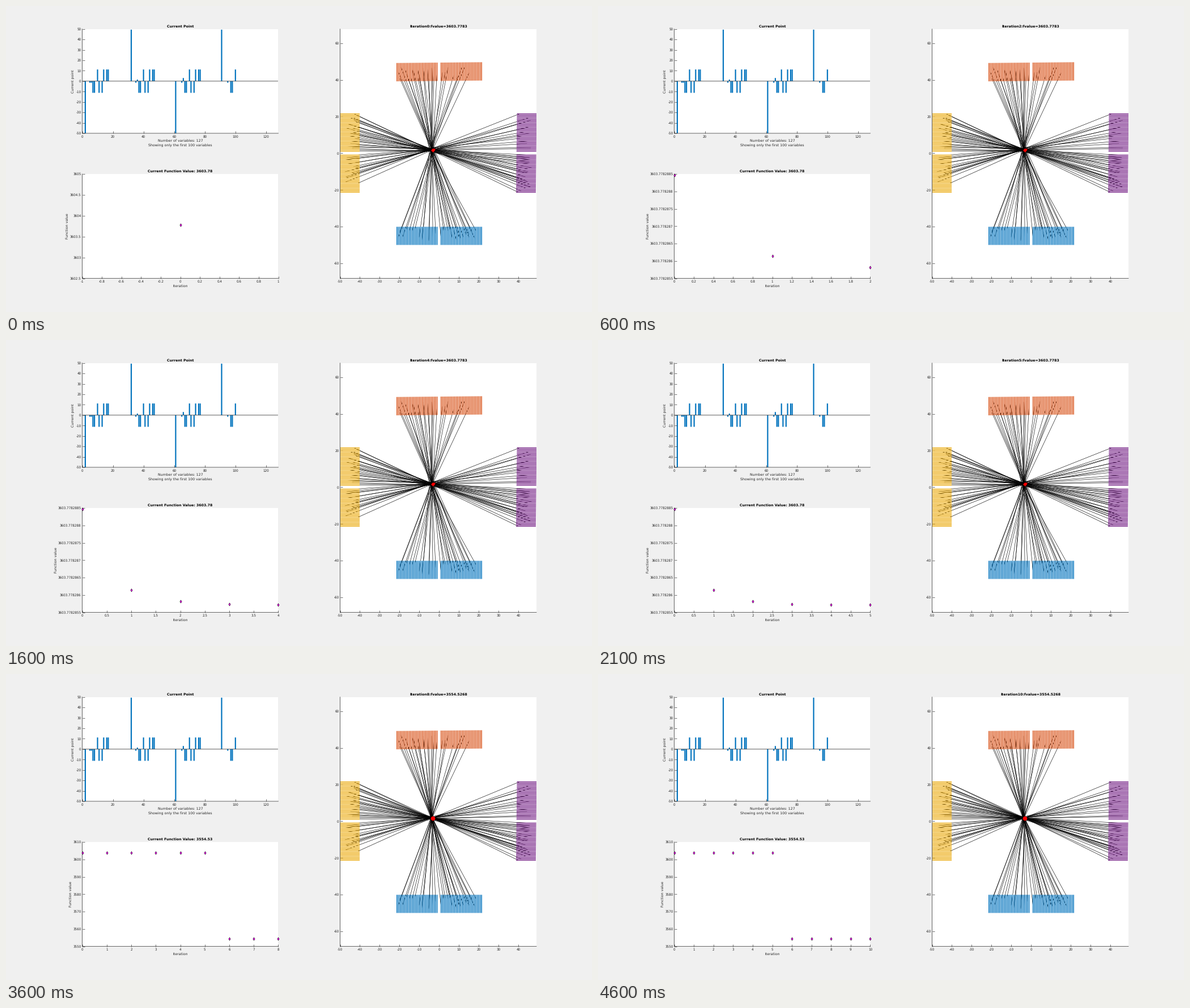
Write a matplotlib script that moves like this. It is 1034 px wide and 541 px high and loops after 5.6 s.

```python
import numpy as np
import matplotlib.pyplot as plt
from matplotlib.animation import FuncAnimation
from matplotlib.collections import LineCollection

W, H, DPI = 1034, 541, 100
PT = 72 / DPI                     # points per pixel
TICK_SIZE, LABEL_SIZE = 5.66, 6.22
INK = "#262626"
BLUE, ORANGE, YELLOW, PURPLE = "#0072BD", "#D95319", "#EDB120", "#7E2F8E"

plt.rcParams.update({
    "font.family": "DejaVu Sans",
    "text.hinting": "none",
    "toolbar": "None",
})

fig = plt.figure(figsize=(W / DPI, H / DPI), dpi=DPI, facecolor="#f0f0f0")


def make_axes(left, top, right, bottom, xlim, ylim):
    """Axes placed by pixel edges, with only left and bottom spines."""
    ax = fig.add_axes([left / W, 1 - bottom / H,
                       (right - left) / W, (bottom - top) / H])
    ax.set(xlim=xlim, ylim=ylim, facecolor="white")
    ax.spines[["top", "right"]].set_visible(False)
    for side in ("left", "bottom"):
        ax.spines[side].set(linewidth=0.7 * PT, color=INK, snap=False)
    style = dict(direction="in", length=3.6 * PT, width=0.65 * PT,
                 color=INK, labelcolor=INK, labelsize=TICK_SIZE * PT)
    ax.tick_params(axis="x", pad=3.2 * PT, **style)
    ax.tick_params(axis="y", pad=2 * PT, **style)
    return ax


def put(x, y, text="", bold=False, rotation=0):
    """Text centred on a pixel position."""
    drop = 0.365 * LABEL_SIZE
    dx, dy = (drop, 0) if rotation else (0, drop)
    return fig.text((x + dx) / W, 1 - (y + dy) / H, text,
                    size=LABEL_SIZE * PT, ha="center", va="baseline",
                    rotation=rotation, rotation_mode="anchor",
                    weight="bold" if bold else "normal",
                    color="black" if bold else INK)


def steps(lo, hi, step):
    count = int(round((hi - lo) / step)) + 1
    return np.round(lo + step * np.arange(count), 7) + 0.0


def set_ticks(axis, values):
    labels = [f"{v:.11g}" for v in values]
    axis.set_ticks(values, labels)
    return max(map(len, labels))


# Current point: bars for the first 100 variables
bars = make_axes(134.5, 40.7, 480.5, 225, (0, 128), (-50, 50))
set_ticks(bars.xaxis, steps(0, 120, 20))
set_ticks(bars.yaxis, steps(-50, 50, 10))

point = np.zeros(101)
point[[2, 61]] = -50
point[[32, 91]] = 49.4
for base, small in zip((0, 30, 60, 90), (-1.5, 1.5, 3, 0)):
    signs = {5: -1.5, 6: small}
    signs.update({k: -11.2 for k in (7, 8, 11, 13)})
    signs.update({k: 11.2 for k in (10, 14, 16, 17)})
    for k, value in signs.items():
        if base + k <= 100:
            point[base + k] = value
used = np.flatnonzero(point)
bars.bar(used, point[used], width=0.8, color=BLUE, linewidth=0, snap=False)
bars.axhline(0, color=INK, lw=0.75 * PT, snap=False)

put(307.5, 35.7, "Current Point", bold=True)
put(307.5, 237.6, "Number of variables: 127")
put(307.5, 245.2, "Showing only the first 100 variables")
put(117.7, 133, "Current point", rotation=90)

# Function value history
BASE = 3603.778
history = [BASE + d * 1e-7 for d in (2884.6, 2861.4, 2858.1, 2857.4, 2857.2, 2857.2)]
history += [3554.5268] * 5

curve = make_axes(134.5, 297, 480.5, 481.5, (-1, 1), (3602.5, 3605))
marks, = curve.plot([], [], ls="", marker="d", ms=3.8 * PT, mfc="#ff00ff",
                    mec="black", mew=0.55 * PT, snap=False,
                    clip_on=False, zorder=5)
curve_title = put(307.5, 292, bold=True)
put(307.5, 494.6, "Iteration")
value_label = put(108, 389, "Function value", rotation=90)
LABEL_X = {4: 113.5, 6: 108, 12: 88}     # by widest tick label


def value_range(it):
    if it == 0:
        return 3602.5, 3605, 0.5
    if it == 1:
        return BASE + 2.860e-4, BASE + 2.885e-4, 5e-7
    if it < 6:
        return BASE + 2.855e-4, BASE + 2.885e-4, 5e-7
    return 3550, 3610, 10


def iteration_range(it):
    if it == 0:
        return -1, 1, 0.2
    return 0, it, {1: 0.1, 2: 0.2}.get(it, 0.5 if it < 6 else 1)


# Lanes around a hub, and the paths that run into it
plan = make_axes(589.5, 40.7, 936, 481.5, (-50, 49.2), (-68.2, 67.7))
set_ticks(plan.xaxis, steps(-50, 40, 10)[[0, 1, 3, 4, 5, 6, 7, 9]]
          if False else steps(-50, 40, 10))
set_ticks(plan.yaxis, steps(-60, 60, 20))
plan_title = put(763, 35.7, bold=True)

LANES = 30
TILT = 0.01
# colour, vertical?, lane span, inner edge, outer edge, paths, lane share used
BLOCKS = [
    (ORANGE, True, (-1, -21.3), 39.4, 49.4, 20, 1.0),
    (ORANGE, True, (1, 21.5), 39.4, 49.4, 8, 0.7),
    (BLUE, True, (-1, -21.3), -40.1, -50, 14, 1.0),
    (BLUE, True, (1, 21.5), -40.1, -50, 18, 0.87),
    (YELLOW, False, (1.1, 21.5), -40.1, -50, 29, 1.0),
    (YELLOW, False, (-1, -21.3), -40.1, -50, 16, 0.76),
    (PURPLE, False, (1.1, 21.5), 39.1, 49.1, 14, 1.0),
    (PURPLE, False, (-1, -21.3), 39.1, 49.1, 28, 0.98),
]

rng = np.random.default_rng(12)
ends = []
for color, vertical, span, inner, outer, count, share in BLOCKS:
    lanes = []
    for pos in np.linspace(*span, LANES):
        shift = TILT * pos if inner > 0 else 0
        lane = np.array([(pos, inner + shift), (pos, outer + shift)])
        lanes.append(lane if vertical else lane[:, ::-1])
    plan.add_collection(LineCollection(lanes, colors=color, zorder=4, snap=False,
                                       linewidths=1.45 * PT, capstyle="butt"))
    picks = (np.arange(count) + rng.uniform(0, 1, count)) / count * share
    for pick in picks:
        a, b = lanes[int(pick * (LANES - 0.01))]
        ends.append(a + (b - a) * rng.uniform(0.08, 0.8))
ends = np.array(ends)

hubs = [np.array([-3.7, 1.9]) + rng.normal(0, 0.5, ends.shape),
        np.array([-3.7, 1.75]) + rng.normal(0, 0.35, ends.shape)]
paths = LineCollection([], colors="black", linewidths=0.6 * PT, zorder=2, snap=False)
plan.add_collection(paths)

spread = rng.normal(0, 1, (16, 2)) * (0.33, 0.6)
loose, = plan.plot(-3.15 + spread[:, 0], 1.9 + spread[:, 1], "o", color="red",
                   ms=2.3 * PT, mew=0, zorder=3, snap=False)
tight, = plan.plot([-3.3], [1.65], "o", color="red", ms=7.6 * PT, mew=0,
                   zorder=3, snap=False)


def update(frame):
    it = min((frame + 4) // 5, 10)
    value = history[it]

    ticks = steps(*iteration_range(it))
    set_ticks(curve.xaxis, ticks)
    curve.set_xlim(ticks[0], ticks[-1])
    ticks = steps(*value_range(it))
    widest = set_ticks(curve.yaxis, ticks)
    curve.set_ylim(ticks[0], ticks[-1])
    value_label.set_x((LABEL_X[widest] + 0.365 * LABEL_SIZE) / W)
    marks.set_data(np.arange(it + 1), history[:it + 1])

    curve_title.set_text(f"Current Function Value: {value:.6g}")
    plan_title.set_text(f"Iteration{it}:fvalue={value:.4f}")

    moved = it >= 6
    paths.set_segments(np.stack([ends, hubs[int(moved)]], axis=1))
    loose.set_visible(not moved)
    tight.set_visible(moved)
    return []


anim = FuncAnimation(fig, update, frames=56, interval=100,
                     init_func=lambda: update(0), repeat=True,
                     repeat_delay=0, blit=False)
plt.show()
```
